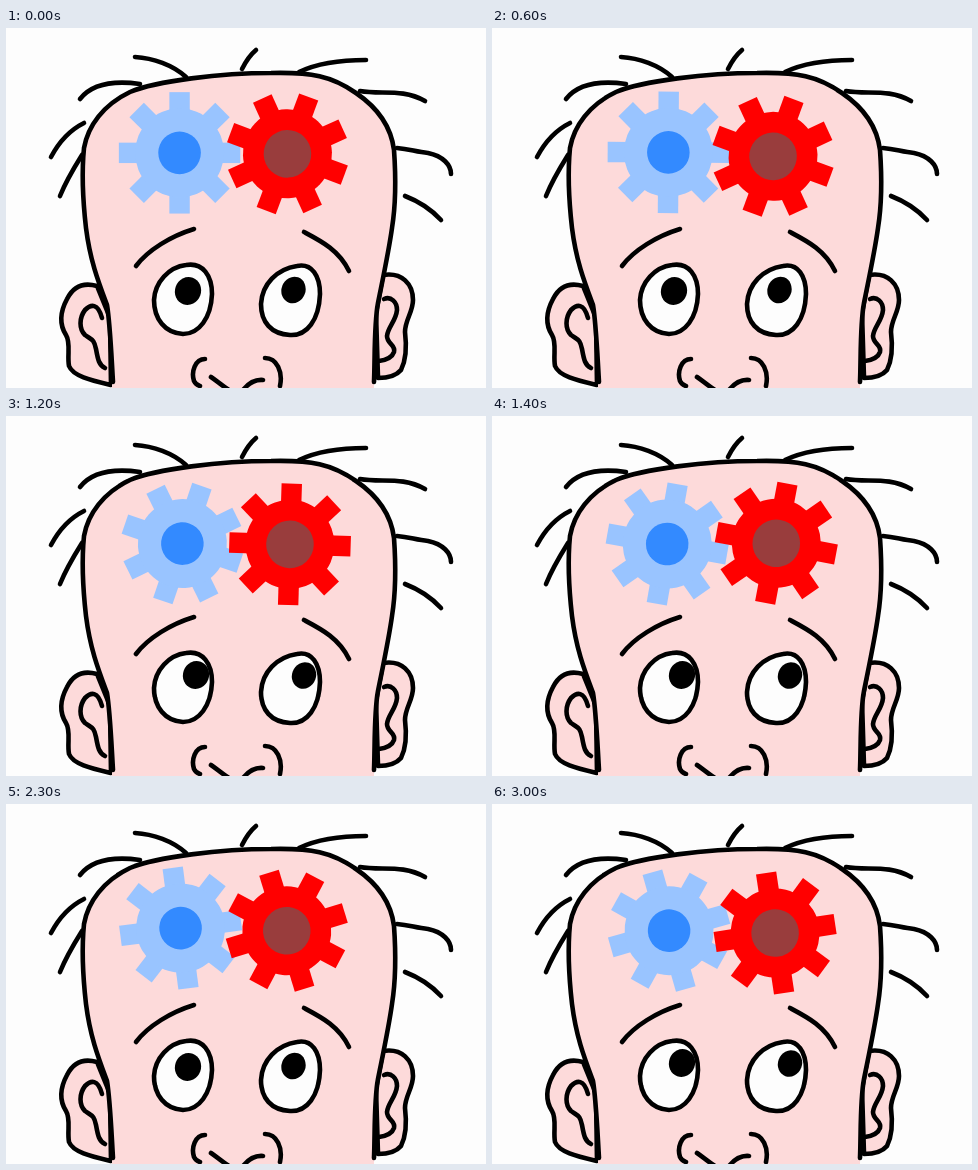
An HTML page for the animation above (3100 ms loop, 480 by 360 pixels).

```html
<!DOCTYPE html>
<html>
<head>
<meta charset="utf-8">
<style>
  html, body { margin: 0; height: 100%; overflow: hidden; background: #fdfdfd; }
  svg { display: block; width: 480px; height: 360px; }
  .ink { fill: none; stroke: #000; stroke-width: 4.6; stroke-linecap: round; stroke-linejoin: round; }
  .skin { fill: #fddada; }
  .white { fill: #fdfdfd; }
</style>
</head>
<body>
<svg viewBox="0 0 480 360">
  <g class="ink">
    <!-- ears -->
    <path class="skin" d="M91 258C77 254 67 259 61 271C54 284 53 296 60 307C65 315 61 327 63 338C67 348 84 352 105 357L104 290Z"/>
    <path class="skin" d="M377 247C396 244 407 256 407 272C407 284 399 292 399 304C401 320 400 332 395 342C390 348 382 350 372 350L370 285Z"/>
    <!-- head -->
    <rect class="skin" x="106" y="340" width="262" height="30" stroke="none"/>
    <path class="skin" d="M107 354C105 320 104 295 101 277C92 253 84 232 80 200C76 165 76 140 78 120C82 98 97 77 124 64C150 53 215 45 265 45C305 44 326 48 350 65C372 80 385 98 388 122C390 150 390 175 386 200C383 222 377 250 372 275C368 295 369 330 368 354"/>
    <path d="M96 290C92 275 85 276 79 282C73 290 73 301 79 307C86 312 88 311 90 321C92 332 93 337 99 340"/>
    <path d="M378 271C385 268 391 274 391 282C390 293 382 299 381 308C381 316 390 317 388 324C386 330 380 332 373 333"/>
    <!-- hair -->
    <path d="M129 29C147 30 167 37 180 49M74 71C85 57 105 52 134 56M78 95C64 102 54 112 45 129M76 127C66 143 60 153 54 168M250 22C244 27 240 33 236 41M293 44C312 35 335 32 360 32M354 63C375 67 396 60 419 73M391 120C404 121 410 124 422 125C437 128 445 137 445 146M399 168C412 173 423 179 435 192"/>
    <!-- brows -->
    <path d="M130 238C142 222 165 208 188 201M298 204C315 213 333 222 343 243"/>
    <!-- eyes -->
    <path class="white" d="M180 237C197 234 206 248 206 266C205 290 193 306 177 306C159 305 148 291 148 272C149 254 163 239 180 237Z"/>
    <path class="white" d="M291 238C306 235 314 248 314 266C313 292 301 308 284 307C265 306 255 294 255 276C256 256 271 241 291 238Z"/>
    <!-- nose -->
    <path d="M199 331C189 331 185 344 188 353Q190 357 194 358M205 349C211 353 215 357 223 362M259 330C271 330 277 344 274 358M257 352Q246 351 237 362"/>
  </g>
  <g id="pupils">
    <ellipse id="leftPupil" rx="13" ry="14"/>
    <ellipse id="rightPupil" rx="12" ry="13.5"/>
  </g>
  <g id="blue" fill="#99c4ff"></g>
  <g id="red" fill="#ff0000"></g>
</svg>
<script>
const STEP = 100, STEPS = 31, SPIN = 18.07;
const $ = id => document.getElementById(id);

function buildGear(id, hubRadius, hubColor) {
  let teeth = '';
  for (let a = 0; a < 360; a += 45)
    teeth += `<rect x="-10.2" y="-60.7" width="20.4" height="24" transform="rotate(${a})"/>`;
  $(id).innerHTML = `${teeth}<circle r="44.5"/><circle r="${hubRadius}" fill="${hubColor}"/>`;
}

// Each gear turns about a pivot slightly off its centre.
function placeGear(id, x, y, wobble, angle, phase) {
  const t = (angle + phase) * Math.PI / 180;
  const cx = x + wobble * Math.cos(t), cy = y + wobble * Math.sin(t);
  $(id).setAttribute('transform', `translate(${cx} ${cy}) rotate(${angle})`);
}

function placePupil(id, [x, y]) {
  $(id).setAttribute('transform', `translate(${x} ${y}) rotate(20)`);
}

const gazes = {
  up: [[182, 263], [287.5, 262]],
  left: [[170, 261], [275, 262]],
  right: [[190, 259], [298, 259.5]]
};

function draw() {
  const step = Math.floor(performance.now() / STEP) % STEPS;
  const turn = Math.max(0, step - 1);
  const beat = turn % 15;
  const gaze = gazes[beat < 8 ? 'up' : beat < 11 ? 'left' : 'right'];
  placePupil('leftPupil', gaze[0]);
  placePupil('rightPupil', gaze[1]);
  placeGear('blue', 175.2, 126, 2, turn * SPIN, -145);
  placeGear('red', 282.5, 127.3, 1.8, 20.5 - turn * SPIN, 214);
  requestAnimationFrame(draw);
}

buildGear('blue', 21.3, '#338aff');
buildGear('red', 23.8, '#993d3d');
draw();
</script>
</body>
</html>
```
